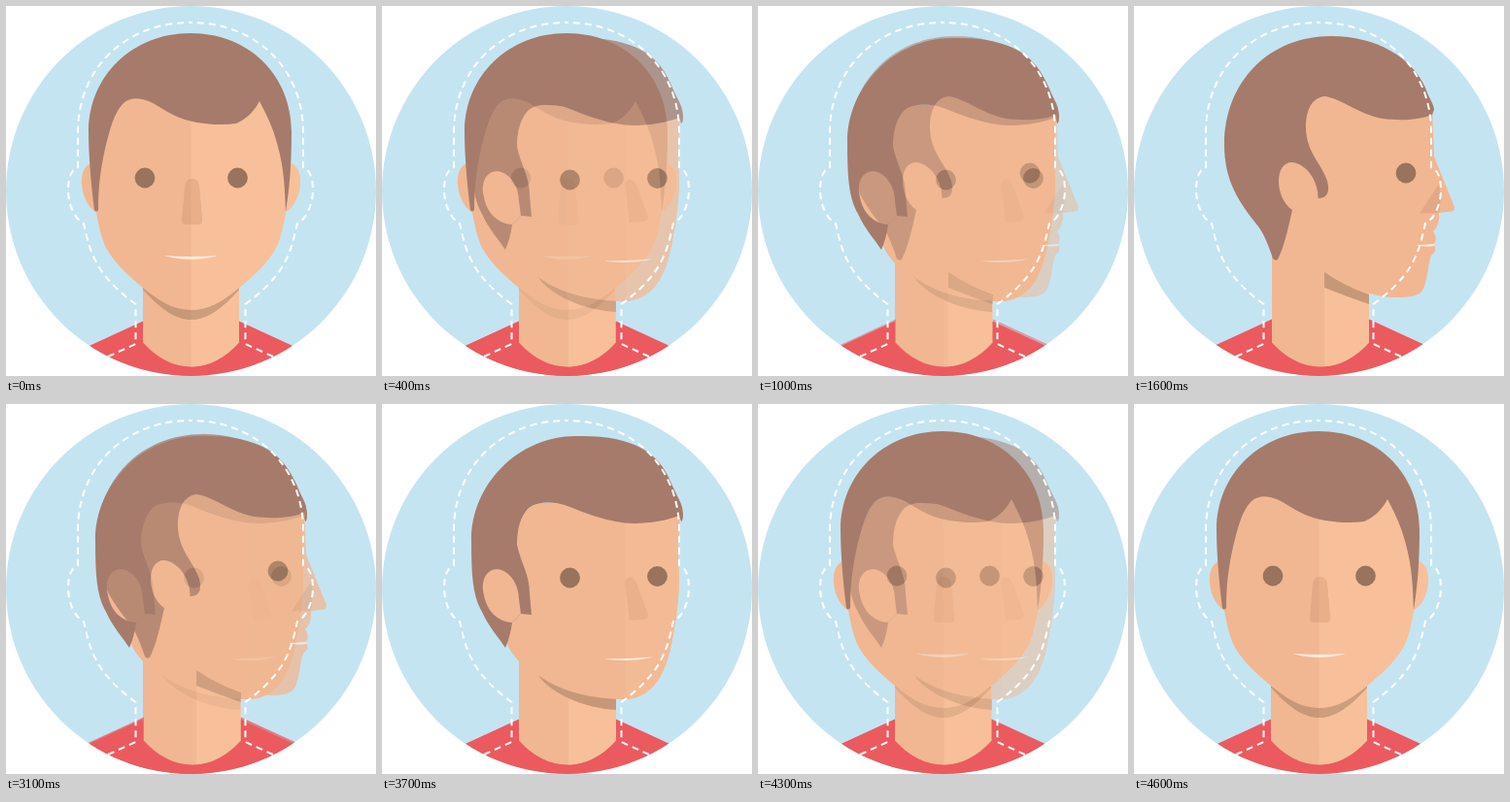
An HTML page with a canvas for the animation above (5600 ms loop, 381x381 px).

```html
<!DOCTYPE html>
<html lang="en">
<head>
<meta charset="utf-8">
<title>Turning head</title>
<style>
  html, body { margin: 0; width: 100%; height: 100%; overflow: hidden; background: #fff; }
  canvas { display: block; width: 381px; height: 381px; }
</style>
</head>
<body>
<canvas id="stage" width="381" height="381"></canvas>
<script>
const SIZE = 381;
const LOOP = 5600;
const SKY = '#c5e4f1', SHIRT = '#eb5a5f', HAIR = '#a67b6b', EYE = '#99735c';
const SKIN = '#f0b792', SKIN_LIT = '#f7c09a', NOSE = '#e3a986', NOSE_LIT = '#e9af89';
const SHADE = '#c79878', SHADE_LIT = '#ce9e7c', LIPS = '#fdeade';

const stage = document.getElementById('stage').getContext('2d');
const disc = new Path2D();
disc.arc(190.5, 190.5, 190.5, 0, Math.PI * 2);

function fill(ctx, color, d) {
  ctx.fillStyle = color;
  ctx.fill(new Path2D(d));
}

// Fills a shape in one tone left of x and another tone right of it.
function fillSplit(ctx, x, left, right, d) {
  fill(ctx, left, d);
  ctx.save();
  ctx.beginPath();
  ctx.rect(x, 0, SIZE, SIZE);
  ctx.clip();
  fill(ctx, right, d);
  ctx.restore();
}

function eye(ctx, x, y) {
  ctx.fillStyle = EYE;
  ctx.beginPath();
  ctx.arc(x, y, 10.4, 0, Math.PI * 2);
  ctx.fill();
}

function body(ctx, left, right, split, neckTop, shoulder) {
  ctx.save();
  ctx.clip(disc);
  fill(ctx, SHIRT, `M${left} ${shoulder} l-64 29.5 V381 H${right + 64} V${shoulder + 29.5} L${right} ${shoulder} Z`);
  ctx.restore();
  fillSplit(ctx, split, SKIN, SKIN_LIT,
    `M${left} ${neckTop} V346.5 C${left + 14} 362 ${left + 31} 371.5 ${(left + right) / 2} 371.5
     C${right - 31} 371.5 ${right - 14} 362 ${right} 346.5 V${neckTop} Z`);
}

function front(ctx) {
  body(ctx, 141, 240, 190.5, 270, 324.5);
  fillSplit(ctx, 190.5, SHADE, SHADE_LIT,
    'M141 270 V292 C160 313 175 323 190.5 323 C206 323 221 313 240 292 V270 Z');
  fill(ctx, SKIN, 'M88 162 C80 164 77 174 78 184 C79 198 86 209 94 213 Z');
  fill(ctx, SKIN_LIT, 'M293 162 C301 164 304 174 303 184 C302 198 295 209 287 213 Z');
  fillSplit(ctx, 190.5, SKIN, SKIN_LIT,
    `M91 150 L92 207 C95 224 98 239 103 249 C110 262 122 274 136 286
     C157 304 172 313 190.5 313 C209 313 224 304 245 286
     C259 274 271 262 278 249 C283 239 286 224 289 207 L291 150 L260 85 H120 Z`);
  fill(ctx, HAIR,
    `M91 210 C87 180 85 150 85 130 C85 72 130 28 190 28
     C251 28 294 72 294 130 C294 155 293 181 288 212
     C287 190 287 169 279 141 C275 126 269 113 261 98
     C256 108 248 116 237 121 C223 123 210 122 197 120
     C180 117 169 111 158 104 C146 96 131 91 121 100
     C111 110 107 127 102 147 C97 170 95 187 95 210 Q93 213 91 210 Z`);
  eye(ctx, 143, 177);
  eye(ctx, 238.5, 177);
  fillSplit(ctx, 190.5, NOSE, NOSE_LIT,
    'M184 186 C185 175 198 175 199 186 L202 221 Q202 225 198 225 H185 Q181 225 181 221 Z');
  fill(ctx, LIPS, 'M163 257 Q190.5 259 218 257 Q190.5 265 163 257 Z');
}

function threeQuarter(ctx) {
  body(ctx, 141, 241, 192, 240, 324.5);
  fill(ctx, SHADE, 'M160 278 C188 297 215 303 241 301 V315 C207 313 173 298 160 278 Z');
  fillSplit(ctx, 251, SKIN, '#f3bb95',
    `M126 240 L130 220 L125 100 L307 108 L305 150 L306 185
     C305 205 303 223 299 242 C294 269 284 303 250 304
     C214 304 180 295 158 277 C144 270 132 258 126 240 Z`);
  fill(ctx, HAIR,
    `M127 251 C120 240 110 230 103 214 C94 198 92 180 92 140
     C92 83 140 33 200 33 C260 32 286 50 299 84
     C304 96 310 103 310 113 Q310 121 308 121 L306 115
     C290 121 270 124 250 122.5 C225 119 206 111 191 105
     C178 100 160 100 151 107 C142 116 139 130 139 145
     C143 164 152 175 152 195 L154 217 L143 216 L134 225 Q132 240 127 251 Z`);
  fill(ctx, SKIN,
    `M134 225 C119 224 108 213 105 197 C101 181 108 170 119 170
     C132 172 141 186 141 201 L143 216 Z`);
  eye(ctx, 193.5, 179);
  eye(ctx, 283.5, 177.5);
  fill(ctx, '#e9b08b', 'M250 183 Q256 173 262 184 L274 217 Q274 222 268 222 L255 223 Z');
  fill(ctx, LIPS, 'M229 262.5 Q255 262.5 279 260.5 Q255 266.5 229 262.5 Z');
}

function side(ctx) {
  body(ctx, 142, 242, 196, 230, 322.5);
  fill(ctx, SKIN,
    `M142 262 L160 200 L180 90 L307 105 L309 155 L330 207 Q330 211 327 211.5 L314 213
     C315 222 312 229 308 232 Q313 239 309 245 Q313 252 306 257
     C303 265 303 275 300 285 C297 300 285 300 268 300
     C254 300 227 294 196 275 L160 262 Z`);
  fill(ctx, SHADE, 'M196 274 Q216 288 242 297 V307 Q218 299 196 290 Z');
  fill(ctx, NOSE, 'M314 183 L294 213.5 L314 213 Q317 197 314 183 Z');
  fill(ctx, HAIR,
    `M143 260 C139 248 134 235 128 227 C108 202 93 180 93 143
     C93 78 139 31 203 31 C250 31 286 53 300 84
     C303 94 309 101 309 107 L307 112 C292 118 272 118 256 116
     C230 111 215 96 197 93 C182 94 177 109 177 125
     C177 150 193 162 199 180 C202 192 199 198 189 198
     L163 210 C159 228 155 247 148 261 Q145 263 143 260 Z`);
  fill(ctx, SKIN,
    `M163 210 C153 203 149 191 149 180 C149 168 155 160 164 161
     C179 164 190 181 189.5 199 L182 214 Z`);
  eye(ctx, 280, 172);
  fill(ctx, LIPS, 'M290 246 Q300 246 309.5 245 V247 Q299 249 290 246 Z');
}

function layer(draw) {
  const canvas = document.createElement('canvas');
  canvas.width = canvas.height = SIZE;
  draw(canvas.getContext('2d'));
  return canvas;
}

const [FRONT, TURNED, SIDE] = [front, threeQuarter, side].map(layer);
const FAINT = 0.5, STRONG = 0.75;

// Start time, solid pose, and the pose laid over it with its opacity.
const steps = [
  [0, FRONT],
  [100, FRONT, TURNED, FAINT],
  [400, FRONT, TURNED, STRONG],
  [700, TURNED],
  [1000, TURNED, SIDE, FAINT],
  [1300, TURNED, SIDE, STRONG],
  [1600, SIDE],
  [3100, TURNED, SIDE, STRONG],
  [3400, TURNED, SIDE, FAINT],
  [3700, TURNED],
  [4000, FRONT, TURNED, STRONG],
  [4300, FRONT, TURNED, FAINT],
  [4600, FRONT]
];

const halfOutline = `M105 361 L133.5 348 V307 C117 295 102 281 93 264
  C85 249 83 236 80 224 C70 219 64 203 64 190 C64 177 67 169 74 166
  V130 C74 64 123 17 190.5 17`;
const outline = new Path2D(halfOutline);
const mirrored = new Path2D();
mirrored.addPath(outline, new DOMMatrix([-1, 0, 0, 1, 380, 0]));

function dashedOutline() {
  stage.strokeStyle = '#fff';
  stage.lineWidth = 2;
  stage.setLineDash([7, 5]);
  stage.stroke(outline);
  stage.stroke(mirrored);
}

function render(now) {
  const time = now % LOOP;
  const [, base, over, alpha] = steps.findLast(([start]) => start <= time);
  stage.fillStyle = '#fff';
  stage.fillRect(0, 0, SIZE, SIZE);
  stage.fillStyle = SKY;
  stage.fill(disc);
  stage.drawImage(base, 0, 0);
  if (over) {
    stage.globalAlpha = alpha;
    stage.drawImage(over, 0, 0);
    stage.globalAlpha = 1;
  }
  dashedOutline();
}

const begin = performance.now();
function tick() {
  render(performance.now() - begin);
  requestAnimationFrame(tick);
}
tick();
</script>
</body>
</html>
```
